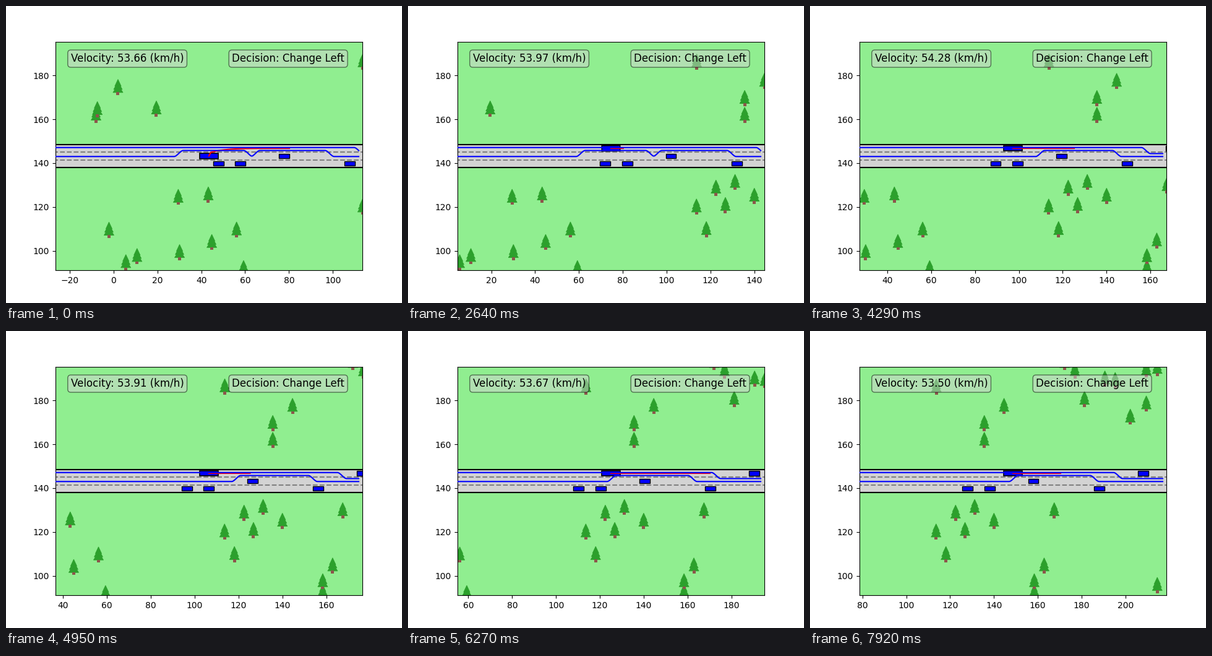
A matplotlib script for the animation above (8000 ms loop, 640x480 px).

```python
import numpy as np
import matplotlib.pyplot as plt
from matplotlib.animation import FuncAnimation
from matplotlib.collections import PolyCollection
from matplotlib.patches import Rectangle

SPAN = 140.0                 # visible road length
SCALE = 496 / SPAN           # pixels per unit
LANE = 3.5
ROAD = 138.0                 # lower road edge
MID = ROAD + 1.5 * LANE
STEP, TICK, LOOP = 330, 40, 8000

SPEED = [(0, 53.66), (4, 51.01), (8, 53.97), (13, 54.28), (17, 53.55),
         (22, 53.85), (24, 53.50)]
CARS = [(0, 0), (10, 0), (30, 1), (60, 0), (80, 2)]      # gap, lane

# centres of the steps in the lower and upper limits, in pixels, per plan
PLANS = [((279, 391.5, 403, 523), 570),
         ((372, 496), 543),
         ((329, 460), 498)]

TREES = [
    (2.0, 174.7), (-8.0, 162.1), (-7.4, 164.6), (19.5, 164.9), (29.5, 124.6),
    (43.2, 125.7), (-2.1, 109.6), (5.6, 94.8), (10.7, 97.6), (30.1, 99.4),
    (44.8, 104.0), (56.1, 109.7), (59.3, 92.1), (113.6, 120.2),
    (122.5, 128.8), (118.1, 109.9), (126.8, 120.9), (113.7, 186.4),
    (135.6, 169.7), (135.6, 162.0), (144.6, 177.5), (131.2, 131.4),
    (140.0, 125.1), (162.9, 104.7), (158.4, 92.4), (158.4, 97.5),
    (167.5, 129.9), (172.2, 197.5), (176.9, 193.7), (181.3, 180.7),
    (190.6, 190.0), (195.3, 189.3), (202.2, 172.6), (209.5, 194.2),
    (209.5, 178.6), (214.5, 194.8), (214.5, 95.8),
]


def smooth(x, a, b):
    t = np.clip((x - a) / (b - a), 0, 1)
    return t * t * (3 - 2 * t)


def jump(x, centre):
    return 2.75 * smooth(x, centre - 7.5, centre + 7.5)


def outline(points):
    pts = np.array(points, float) / SCALE
    return [pts + np.array(tree) for tree in TREES]


def vehicle(w, h, lw):
    box = Rectangle((0, 0), w, h, rotation_point='center', facecolor='blue',
                    edgecolor='black', lw=lw, zorder=3)
    return ax.add_patch(box)


def place(box, x, y):
    box.set_xy((x - box.get_width() / 2, y - box.get_height() / 2))


def ego_y(k):
    return MID + LANE * smooth(k, 1, 8.1)


fig = plt.figure(figsize=(6.4, 4.8), dpi=100)
ax = fig.add_axes([0.125, 0.11, 0.775, 0.77])
ax.set_facecolor('lightgreen')
half_height = 369.6 / SCALE / 2
ax.set_ylim(MID - half_height, MID + half_height)
ax.set_yticks(range(100, 181, 20))

ax.axhspan(ROAD, ROAD + 3 * LANE, facecolor='lightgray', edgecolor='none', zorder=0.5)
for i in range(4):
    style = dict(color='gray', ls='--') if i in (1, 2) else dict(color='black')
    ax.plot([-200, 400], [ROAD + i * LANE] * 2, lw=1.5, zorder=1, **style)

foliage = []
for half, base, tip in ((7.9, -8.8, 4), (6.8, -3.8, 8.5), (5, 1.5, 12.2)):
    foliage += outline([(-half, base), (half, base), (0, tip)])
trunks = outline([(-2.5, -13), (2.5, -13), (2.5, -8.5), (-2.5, -8.5)])
for shapes, color, lw in ((foliage, 'tab:green', 0.7), (trunks, 'tab:brown', 0)):
    ax.add_collection(PolyCollection(shapes, facecolor=color, edgecolor=color,
                                     lw=lw, zorder=2), autolim=False)

cars = [vehicle(4.75, 2.0, 1) for _ in CARS]
ego = vehicle(8.3, 2.5, 1.2)
route, = ax.plot([], [], color='red', lw=1.5, zorder=4)
low, = ax.plot([], [], color='blue', lw=1.5, zorder=5)
high, = ax.plot([], [], color='blue', lw=1.5, zorder=5)

note = dict(transform=ax.transAxes, fontsize=12, va='top', zorder=6,
            bbox=dict(boxstyle='round', facecolor='lightgray', alpha=0.5))
speed = ax.text(0.05, 0.95, '', **note)
ax.text(0.575, 0.95, 'Decision: Change Left', **note)

PX = np.linspace(79, 570, 492)


def draw(i):
    k = (i * TICK + TICK - 1) // STEP
    n = max(k - 1, 0)                        # everything waits one step
    plan = (k + 1) // 10

    left = -26.5 + 4.385 * n + 0.00815 * n * n
    ax.set_xlim(left, left + SPAN)
    ax.set_xticks(range(int(np.ceil(left / 20)) * 20, int(left + SPAN) + 1, 20))

    shift = 47.8 + 3.44 * n + 0.002 * n * n
    for box, (gap, lane) in zip(cars, CARS):
        place(box, gap + shift, ROAD + (lane + 0.5) * LANE)

    # lane change of the main vehicle
    x, y = left + SPAN / 2, ego_y(k)
    slope = (ego_y(k + 0.1) - ego_y(k - 0.1)) / 0.2 / 4.45
    place(ego, x, y)
    ego.set_angle(np.degrees(np.arctan(slope)))

    goal = 80.2 + 45.05 * plan
    ahead = np.linspace(min(x + 0.8, goal), goal, 60)
    path = MID + LANE - 1.9 * np.exp(-(ahead - 44.3) / 6)
    route.set_data(np.r_[x, ahead], np.r_[y, path])

    world = left + (PX - 80) / SCALE
    steps, drop = PLANS[plan]
    low.set_data(world, 143 + sum((-1) ** j * jump(PX, c) for j, c in enumerate(steps)))
    high.set_data(world, 147.1 - jump(PX, drop))

    speed.set_text(f'Velocity: {np.interp(k, *zip(*SPEED)):.2f} (km/h)')
    return []


anim = FuncAnimation(fig, draw, frames=LOOP // TICK, interval=TICK,
                     init_func=lambda: draw(0), repeat=True, repeat_delay=0)
plt.show()
```
